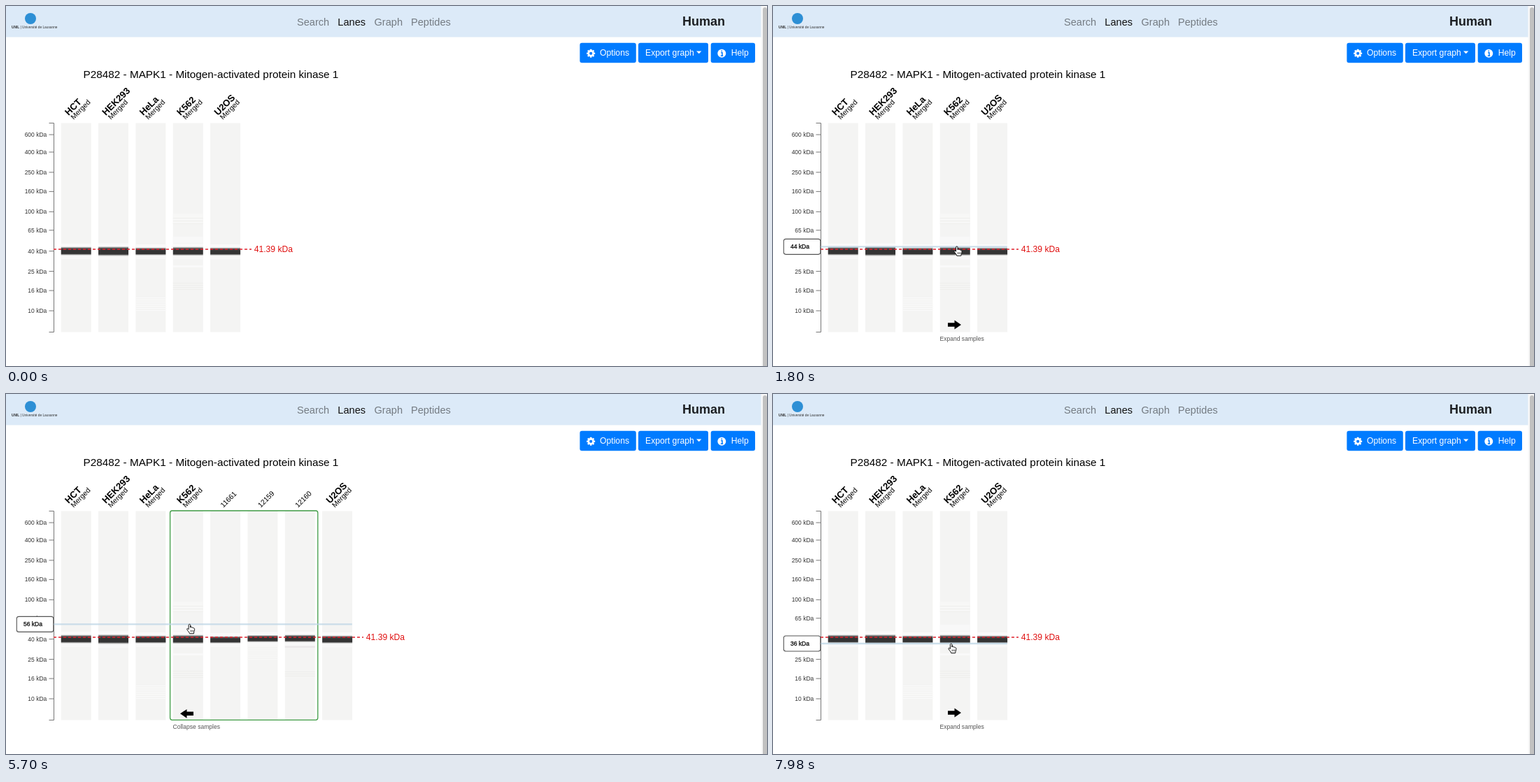
An HTML page for the animation above (8 s loop, 1088 px wide and 515 px high).

```html
<!DOCTYPE html>
<html lang="en">
<head>
<meta charset="utf-8">
<title>Protein lanes</title>
<style>
html, body { margin: 0; width: 100%; height: 100%; overflow: hidden; background: #fff; }
svg { display: block; width: 1088px; height: 515px; font-family: "Liberation Sans", Arial, sans-serif; }
</style>
</head>
<body>
<svg id="stage" viewBox="0 0 1088 515" xmlns="http://www.w3.org/2000/svg"></svg>
<script>
const LOOP = 8000, STEP = 60;
const SHOW = 900, EXPAND = 3780, COLLAPSE = 7500;
const LANE_X = 78.7, PITCH = 53.35, LANE_W = 43, TOP = 167.5, BOTTOM = 466.5;

const text = (x, y, size, str, attrs = '') =>
  `<text x="${x}" y="${y}" font-size="${size}" ${attrs}>${str}</text>`;
const rect = (x, y, w, h, fill, attrs = '') =>
  `<rect x="${x}" y="${y}" width="${w}" height="${h}" fill="${fill}" ${attrs}/>`;
const slanted = (x, y, size, str, attrs = '') =>
  text(0, 0, size, str, `transform="translate(${x} ${y}) rotate(-45)" ${attrs}`);

// Faint stripes are [y, height, shade].
function lane(index, name, from, to, stripes = [], sample = false) {
  const x = LANE_X + PITCH * index;
  const label = sample
    ? slanted(x + 18.7, 163, 10.2, name)
    : slanted(x + 10.8, 157.3, 13.2, name, 'font-weight="bold"') + slanted(x + 18, 163, 10.3, 'Merged');
  return label + rect(x, TOP, LANE_W, BOTTOM - TOP, '#f4f4f3')
    + stripes.map(([y, h, shade]) => rect(x, y, LANE_W, h, shade)).join('')
    + rect(x, from - 6, LANE_W, 5, '#fafafa')
    + rect(x, from - 2, LANE_W, to - from + 4, 'url(#band)')
    + rect(x, to + 2, LANE_W, 5, '#f8f8f8');
}

const striped = (y, count, gap, shade) =>
  Array.from({ length: count }, (_, i) => [y + i * gap, 1, shade]);

const kDaToY = mass => 436 - 141.7 * (Math.log10(mass) - 1);
const yToKDa = y => Math.round(10 ** (1 + (435.1 - y) / 141.7));

function header() {
  const nav = [[416, 'Search'], [474.3, 'Lanes'], [526.5, 'Graph'], [579, 'Peptides']];
  return rect(0, 0, 1080, 44.5, '#dceaf8')
    + '<circle cx="35" cy="18" r="8" fill="#2d8fd5"/>'
    + text(8, 32, 4.8, '<tspan font-weight="bold">UNIL</tspan> | Université de Lausanne', 'fill="#333"')
    + nav.map(([x, s]) => text(x, 27.5, 14.6, s, `fill="${s === 'Lanes' ? '#111' : '#747b82'}"`)).join('')
    + text(967, 28, 18, 'Human', 'font-weight="bold" fill="#1c1f22"')
    + rect(1079.5, 0, 8.5, 515, '#f8f8f8')
    + rect(1082, 2, 6, 520, '#c1c1c1', 'rx="3"');
}

function buttons() {
  const button = (x, w, tx, label) =>
    rect(x, 52.7, w, 28.6, '#007bff', 'rx="3"') + text(tx, 71, 12.2, label, 'fill="#fff"');
  const teeth = Array.from({ length: 8 }, (_, i) =>
    rect(-1.3, -6, 2.6, 3, '#fff', `rx=".5" transform="rotate(${i * 45})"`)).join('');
  return button(820.4, 80.4, 849, 'Options') + button(904, 100, 914, 'Export graph') + button(1007.7, 63.3, 1036.7, 'Help')
    + `<g transform="translate(836.2 67.8)">${teeth}<circle r="3.4" fill="none" stroke="#fff" stroke-width="2.6"/></g>`
    + '<path d="M987 64.5h7.4l-3.7 3.8z" fill="#fff"/>'
    + '<circle cx="1023.3" cy="67.8" r="6" fill="#fff"/>'
    + '<path d="M1022.2 66.8h1.8v4M1021.8 71.2h3.4M1023.3 63.6v1.7" fill="none" stroke="#007bff" stroke-width="1.5"/>';
}

function axis() {
  const masses = [600, 400, 250, 160, 100, 65, 40, 25, 16, 10];
  const ticks = masses.map(m => `M61.5 ${kDaToY(m)}h7`).join('');
  return `<path d="M61.5 ${TOP}h7V${BOTTOM}h-7${ticks}" fill="none" stroke="#777" stroke-width="1"/>`
    + masses.map(m => text(58.3, kDaToY(m) + 3, 8.5, m + ' kDa', 'text-anchor="end" fill="#333"')).join('');
}

const k562 = [[297, 14, '#f7f7f6'], ...striped(303, 3, 4, '#efefed'), [330, 9, '#f8f8f8'],
  [371, 3, '#f9f9f9'], ...striped(396, 4, 3, '#eeeeec')];

document.getElementById('stage').innerHTML = `
<defs><linearGradient id="band" x1="0" y1="0" x2="0" y2="1">
  <stop offset="0" stop-color="#aaa" stop-opacity="0"/>
  <stop offset=".2" stop-color="#555"/><stop offset=".4" stop-color="#343434"/>
  <stop offset=".8" stop-color="#343434"/><stop offset="1" stop-color="#888" stop-opacity="0"/>
</linearGradient></defs>
${rect(0, 0, 1088, 515, '#fff')}${header()}${buttons()}
${text(110.6, 103, 15.3, 'P28482 - MAPK1 - Mitogen-activated protein kinase 1')}
${axis()}
${lane(0, 'HCT', 346, 355)}
${lane(1, 'HEK293', 345.5, 356)}
${lane(2, 'HeLa', 347, 355, striped(417, 7, 3, '#fafafa'))}
${lane(3, 'K562', 346, 355.5, k562)}
<g id="samples">
${lane(4, '11661', 348, 355, [], true)}
${lane(5, '12159', 346.5, 353.3, striped(361, 7, 3, '#f8f8f7'), true)}
${lane(6, '12160', 346, 353.3, [[360, 3, '#ebe9ea'], ...striped(397, 3, 3, '#ededeb')], true)}
${rect(234.6, 167, 211.2, 299.3, 'none', 'rx="3" stroke="#3f9b45" stroke-width="1.3"')}
</g>
<g id="tail">${lane(4, 'U2OS', 347, 355.2)}</g>
<path id="guide" stroke="#bcd5e5" stroke-width="2.3" opacity=".75"/>
<path id="marker" stroke="#e0202c" stroke-width="1.4" stroke-dasharray="4 3"/>
${text(0, 351.5, 12.1, '41.39 kDa', 'id="mass" fill="#e01010"')}
<g id="hover">
  <path id="arrow" d="M-9.5-2.7H0V-6.4L9.5 0 0 6.4V2.7H-9.5z"/>
  ${text(238.5, 479, 8.55, '', 'id="hint" fill="#555"')}
  <g id="tip">${rect(15.3, -11, 52.5, 22, '#fff', 'rx="3" stroke="#555" stroke-width="1.1"')}
  ${text(25, 3, 8.5, '', 'id="tipText" stroke="#000" stroke-width=".25"')}</g>
  <path id="hand" d="M-1.3 7.5V1.4C-1.3-.2 1.2-.2 1.2 1.4V5C2-.0 1.2 4.4 3.2 5 3.9 4.6 5 4.8 5.2 5.7 6.2 5.4 7.2 6 7.2 7.2 7.2 9.6 6.2 10.3 6 13.6H0C-.3 11.4-2.6 10-3.7 7.6-4.2 6.3-2.7 5.7-1.3 7.5z" fill="#fff" stroke="#111" stroke-width="1" stroke-linejoin="round"/>
  <path id="knuckles" d="M1.4 8.5v2.7M3.2 8.5v2.7M5 8.5v2.7" stroke="#111" stroke-width=".7"/>
</g>`;

const el = Object.fromEntries([...document.querySelectorAll('#stage [id]')].map(n => [n.id, n]));
const place = (node, x, y, extra = '') => node.setAttribute('transform', `translate(${x} ${y}) ${extra}`);
const show = (node, on) => node.setAttribute('display', on ? 'inline' : 'none');

// Pointer path: [time, x, y]
const PATH = [[900, 279, 461], [1260, 269, 372.6], [1320, 267.4, 368], [1680, 263, 345], [2520, 262, 336],
  [2760, 261.5, 331.4], [5100, 261.5, 331.4], [6360, 263.5, 326.7], [6480, 263.5, 326.7],
  [7380, 262.3, 334.2], [7500, 262.3, 334.2], [7920, 254.7, 357]];

function pointer(t) {
  const i = PATH.findIndex(p => p[0] > t);
  if (i === 0) return PATH[0].slice(1);
  if (i < 0) return PATH[PATH.length - 1].slice(1);
  const [a, b] = [PATH[i - 1], PATH[i]];
  const k = (t - a[0]) / (b[0] - a[0]);
  return [a[1] + (b[1] - a[1]) * k, a[2] + (b[2] - a[2]) * k];
}

function draw(t) {
  const hovering = t >= SHOW, open = t >= EXPAND && t < COLLAPSE;
  const shift = open ? PITCH * 3 : 0;
  show(el.samples, open);
  place(el.tail, shift, 0);
  el.marker.setAttribute('d', `M68 348H${351 + shift}`);
  el.mass.setAttribute('x', 354.8 + shift);
  show(el.hover, hovering);
  show(el.guide, hovering);
  if (!hovering) return;

  const [x, y] = pointer(t);
  const lineY = pointer(t - STEP)[1];
  place(el.hand, x, y);
  place(el.knuckles, x, y);
  place(el.tip, 0, lineY);
  el.tipText.textContent = yToKDa(lineY) + ' kDa';
  el.guide.setAttribute('d', `M68 ${lineY}H${334.8 + shift}`);
  place(el.arrow, open ? 258.5 : 259.5, open ? 457.3 : 456, open ? 'scale(-1 1)' : '');
  el.hint.textContent = open ? 'Collapse samples' : 'Expand samples';
}

const start = performance.now();
function tick() {
  const t = (performance.now() - start) % LOOP;
  draw(Math.floor(t / STEP) * STEP);
  requestAnimationFrame(tick);
}
tick();
</script>
</body>
</html>
```
